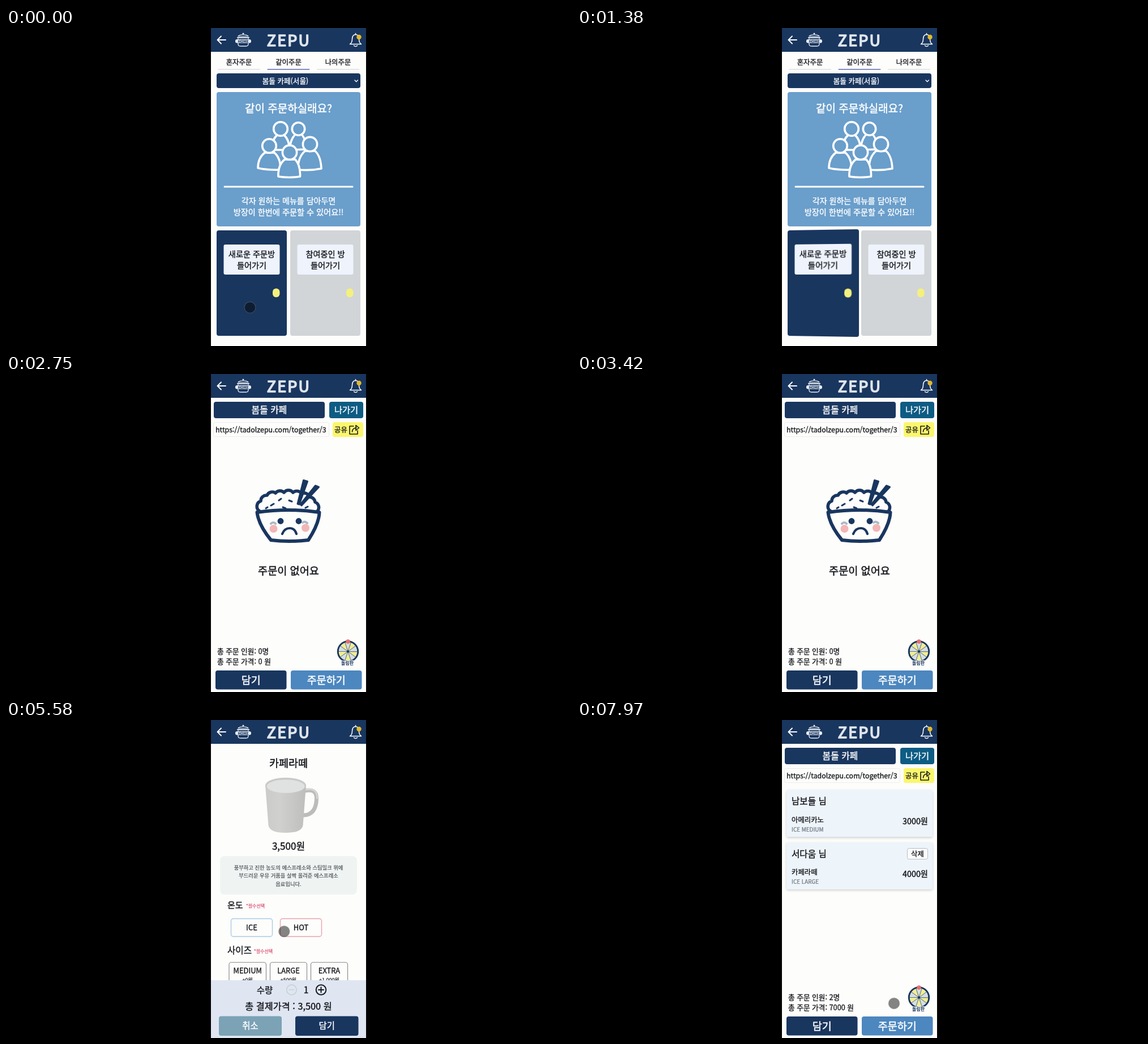
Recreate the animation shown at these times as an HTML page. Size 998 by 561 pixels, loop 8 s.

```html
<!DOCTYPE html>
<html lang="ko">
<head>
<meta charset="utf-8">
<title>같이주문</title>
<style>
html, body { margin: 0; width: 100%; height: 100%; overflow: hidden; background: #000; }
#stage { position: relative; width: 998px; height: 561px; overflow: hidden; }
svg { position: absolute; left: 0; top: 0; overflow: hidden; }
text { font-family: "Noto Sans CJK KR", "Noto Sans CJK", sans-serif; font-weight: 500; stroke-linejoin: round; }
#door { left: 372px; top: 357px; transform-origin: 0 50%; overflow: visible; }
</style>
</head>
<body>
<div id="stage">
  <svg id="base" width="998" height="561"></svg>
  <svg id="door" width="124" height="186" viewBox="372 357 124 186"></svg>
  <svg id="top" width="998" height="561"></svg>
</div>
<script>
const NAVY = '#19365f', GREY = '#d1d5d8', PAPER = '#fdfdfb', INK = '#15171c', BLUE = '#6a9ecb';
const LOOP = 8000;
const $ = id => document.getElementById(id);

// y is the vertical middle of the line; extra attributes win over the defaults
const text = (s, x, y, size, fill = INK, anchor = 'middle', extra = '') =>
  `<text ${extra} x="${x}" y="${y + size * 0.37}" font-size="${size}" fill="${fill}" text-anchor="${anchor}"
    stroke="${fill}" stroke-width="${size * 0.025}">${s}</text>`;
const left = (s, x, y, size, fill, extra) => text(s, x, y, size, fill, 'start', extra);
const box = (x1, y1, x2, y2, fill, r = 4, extra = '') =>
  `<rect x="${x1}" y="${y1}" width="${x2 - x1}" height="${y2 - y1}" rx="${r}" fill="${fill}" ${extra}/>`;
const disc = (x, y, r, fill, extra = '') => `<circle cx="${x}" cy="${y}" r="${r}" fill="${fill}" ${extra}/>`;
const line = (d, color, width, fill = 'none') =>
  `<path d="${d}" fill="${fill}" stroke="${color}" stroke-width="${width}" stroke-linecap="round" stroke-linejoin="round"/>`;
const group = (id, body) => `<g id="${id}">${body}</g>`;
const button = (s, x1, y1, x2, y2, fill, size, color = '#fff') =>
  box(x1, y1, x2, y2, fill) + text(s, (x1 + x2) / 2, (y1 + y2) / 2, size, color);

const header = () =>
  box(362, 0, 636, 561, PAPER, 0) + box(362, 0, 636, 42, NAVY, 0) +
  line('M388 21H374M380 14.5L373.5 21L380 27.5', '#fff', 2) +
  // pot
  line('M410 14.5Q413 11.5 419 11.5Q425 11.5 428 14.5Z', '#e9eef4', 1.2) +
  disc(419, 10, 1.5, '#e9eef4') +
  box(408, 16, 430, 18, '#e9eef4', 1) +
  line('M410 19V28Q410 32 414 32H424Q428 32 428 28V19', '#e9eef4', 1.3) +
  box(405, 20, 433, 26.5, '#e9eef4', 3) +
  text('HOME', 419, 23.2, 6.4, NAVY, 'middle', 'style="font-weight:700"') +
  text('ZEPU', 499.5, 22, 27, '#dfe5ec', 'middle', 'letter-spacing="2.2" stroke-width="1.7"') +
  // bell
  line('M607.5 28.5Q611.5 26 611.5 19.5Q611.5 12 617.5 11.5Q623.5 12 623.5 19.5Q623.5 26 627.5 28.5Z', '#fff', 1.5) +
  line('M614.5 31Q617.5 34 620.5 31M617.5 11V9.5', '#fff', 1.5) + disc(623.5, 16, 4.2, '#e5b92b');

const person = (x, y, r, body) => line(body, '#fff', 3.6, BLUE) + disc(x, y, r, BLUE, 'stroke="#fff" stroke-width="3.6"');

const people = () =>
  person(485, 178, 12.3, 'M469 215Q470 196 479 189H491Q500 196 501 215Z') +
  person(516.5, 178, 11.2, 'M501 215Q502 196 511 188H522Q529 194 531 214Z') +
  person(465, 208, 12.3, 'M445 247Q445 229 457 220H474Q485 229 485 250Q462 251 445 247Z') +
  person(537, 205, 12.6, 'M516 250Q515 229 528 217H546Q556 226 557 248Q538 252 516 250Z') +
  person(501, 219.5, 12.6, 'M481 262Q480 242 492 232H511Q520 242 519.5 262Q500 265 481 262Z');

const doorBody = (x, color, a) =>
  box(x, 357, x + 124, 543, color) + box(x + 12.5, 382, x + 111.5, 435, '#eef3fc', 3) +
  text(a, x + 62, 398.5, 14.2) + text('들어가기', x + 62, 419, 14.2) +
  box(x + 99, 459.5, x + 111.5, 475, '#f4f07e', 6);

const home = () =>
  ['혼자주문', '같이주문', '나의주문'].map((s, i) =>
    text(s, 411.5 + i * 87.5, 60, 12.4) +
    box(374 + i * 87.5, 72, 449 + i * 87.5, 74, i == 1 ? '#858bc4' : '#e4e6ec', 1)).join('') +
  box(372, 80, 626, 106, NAVY) + text('봄돌 카페(서울)', 493.5, 93, 12.6, '#fff') +
  line('M616 92L618.7 94.7L621.4 92', '#fff', 1.4) +
  box(372, 113, 626, 350, BLUE) + text('같이 주문하실래요?', 499, 142, 19, '#fff') +
  people() + line('M386 280H612', '#fff', 3) +
  text('각자 원하는 메뉴를 담아두면', 499, 304.5, 14, '#fff') +
  text('방장이 한번에 주문할 수 있어요!!', 499, 324.5, 14.2, '#fff') +
  doorBody(502, GREY, '참여중인 방');

const modal = () => {
  const light = 'style="font-weight:300" stroke-width="0.2"';
  return box(394.5, 202, 603.5, 361.5, PAPER, 4, `stroke="${NAVY}" stroke-width="1.6"`) +
    text('봄돌 카페에', 499, 241, 17.4, '#30343c', 'middle', light) +
    text('방을 만드시겠습니까?', 499, 268.5, 17.6, '#30343c', 'middle', light) +
    button('취소', 442, 306, 488, 336, GREY, 11.6, '#555a60') +
    button('만들기', 500, 306, 557, 336, NAVY, 11.8);
};

const wheel = () => {
  const cx = 604, cy = 489.5, r = 17;
  const at = i => `${cx + r * Math.cos(i * Math.PI / 5)} ${cy + r * Math.sin(i * Math.PI / 5)}`;
  let s = '';
  for (let i = 0; i < 10; i++)
    s += line(`M${cx} ${cy}L${at(i)}A${r} ${r} 0 0 1 ${at(i + 1)}Z`, '#5a6f80', 1, i % 2 ? '#d5dee4' : '#f1ee92');
  return s + disc(cx, cy, 17.8, 'none', `stroke="${NAVY}" stroke-width="2.8"`) + disc(cx, cy, 2.2, NAVY) +
    disc(604, 472, 3.8, '#e56f6c') +
    text('돌림판', 603, 510.5, 8, NAVY, 'middle', `stroke="${PAPER}" stroke-width="2" paint-order="stroke" style="font-weight:700"`);
};

const bowl = () => {
  const lumps = ['450 224', '461 214', '476 210', '491 209', '507 209', '522 211', '536 217', '546 226', '550 242'];
  return line('M448 242' + lumps.map(p => `A10 10 0 0 1 ${p}`).join(''), NAVY, 5.6, PAPER) +
    line('M468 232L473 229M482 223L486 220M489 235L494 237M500 223L505 225M529 236L533 234M459 237L462 235', NAVY, 3) +
    line('M525.5 187.5L532.5 189.5L518 230L515 229Z', NAVY, 3, NAVY) +
    line('M546.5 197L552.5 199.5L522 232L520 230Z', NAVY, 3, NAVY) +
    line('M443.5 244Q499 236 553.5 244Q553 264 534 293Q500 297 468 293Q446 266 443.5 244Z', NAVY, 6, PAPER) +
    disc(472.5, 273, 7, '#f2b6b6') + disc(529, 271.5, 7, '#f2b6b6') +
    line('M468 264Q472 260 476 264M524 262Q528 259 532 263', '#aab9c8', 4) +
    disc(485, 259.5, 5.4, NAVY) + disc(517, 259.5, 5.4, NAVY) +
    line('M488 282Q492 272 501 272Q510 272 513 282', NAVY, 4.2);
};

const room = () =>
  button('봄돌 카페', 367, 49, 563, 78, NAVY, 15.9) +
  button('나가기', 571, 49, 631, 78, '#0e5c84', 15.3) +
  box(366.5, 85.5, 570.5, 110.5, PAPER, 3, 'stroke="#ececec"') +
  left('https://tadolzepu.com/together/3', 370, 98, 12.4) +
  box(577, 85, 631, 111, '#fbf66c') + text('공유', 591.5, 98, 12.4) +
  line('M614 92H607V106H621V100M611.5 102Q612 95 619 95M618 90.5L623.5 95L618 99.5Z', INK, 1.6) +
  left('', 373, 489, 12.7, INK, 'id="headcount"') + left('', 373, 507, 12.7, INK, 'id="sum"') +
  wheel() +
  button('담기', 370, 523, 495.5, 556.5, NAVY, 18.5) +
  button('주문하기', 503, 523, 628.5, 556.5, '#4c87bf', 18.5);

const card = (y, name, item, option, price) =>
  box(370, y, 628, y + 83, '#edf4fa', 3, 'filter="url(#shade)"') +
  left(name + ' 님', 379, y + 20.5, 15.6) + left(item, 379, y + 53, 12.4) +
  left(option, 379, y + 70, 9.9, '#6d747c') + text(price + '원', 620, y + 56, 14.3, INK, 'end');

const orders = () =>
  card(123, '남보들', '아메리카노', 'ICE MEDIUM', 3000) +
  card(215.5, '서다움', '카페라떼', 'ICE LARGE', 4000) +
  box(583.5, 226.5, 619.5, 245.5, '#fbfcfd', 3, 'stroke="#b9bec4"') + text('삭제', 601.5, 236, 12.4);

const mug = () =>
  line('M527 125Q548.5 120 548.5 138Q548 167 526 168', '#bcbcba', 7) +
  line('M529 123Q550 119 549.5 138', '#d8d8d6', 2.5) +
  '<path d="M458 115L463.5 186Q466 199 494 199Q522 199 524.5 186L530 115Z" fill="url(#mugTone)"/>' +
  '<ellipse cx="494" cy="115.5" rx="36" ry="13.8" fill="#c9c9c7"/>' +
  '<ellipse cx="494" cy="117" rx="33.5" ry="11.8" fill="#e0e2e1"/>';

const option = (id, s, x1, x2, color) =>
  box(x1 + .5, 350.5, x2 - .5, 382, PAPER, 4, `id="${id}" stroke="${color}" stroke-width="1.4"`) +
  text(s, (x1 + x2) / 2, 366, 13);
const size = (id, s, x1, x2, extra) =>
  box(x1 + .5, 427.5, x2 - .5, 475, PAPER, 4, `id="${id}" stroke="#8c8f90" stroke-width="1.2"`) +
  text(s, (x1 + x2) / 2, 442.5, 12.9) + text(`+${extra}원`, (x1 + x2) / 2, 458.5, 9);

const detail = () =>
  text('카페라떼', 499, 76, 18.5) + mug() + text('3,500원', 499, 223, 17) +
  box(378, 240, 620, 308, '#eff4f3', 8) +
  ['풍부하고 진한 농도의 에스프레소와 스팀밀크 위에', '부드러운 우유 거품을 살짝 올려준 에스프레소', '음료입니다.']
    .map((s, i) => text(s, 499, 260.5 + i * 14.5, 9.3, '#4b5054')).join('') +
  left('온도', 391, 326, 15) + left('*필수선택', 424, 328, 8, '#d8486b') +
  option('ice', 'ICE', 397, 471, '#a9cbe9') + option('hot', 'HOT', 484, 558, '#eaa3b1') +
  left('사이즈', 391, 406.5, 15.6) + left('*필수선택', 438, 408.5, 8, '#d8486b') +
  size('medium', 'MEDIUM', 393.5, 460, '0') + size('large', 'LARGE', 466, 532, '500') +
  size('extra', 'EXTRA', 538, 604, '1,000') +
  box(362, 459, 636, 561, '#dfe6f2', 0) +
  text('수량', 457, 476, 15.2) + text('1', 530, 476, 15.5) +
  disc(504.5, 476, 8.8, 'none', 'stroke="#c8d1d1" stroke-width="1.7"') + line('M500 476H509', '#c8d1d1', 1.7) +
  disc(556.5, 476, 8.8, 'none', `stroke="${INK}" stroke-width="2"`) + line('M552 476H561M556.5 471.5V480.5', INK, 2) +
  text('', 499, 504.5, 16.3, INK, 'middle', 'id="total"') +
  button('취소', 376, 522.5, 487, 557, '#7ca2b5', 15.4) + button('담기', 511, 522.5, 622.5, 557, NAVY, 15.4);

$('base').innerHTML = `<defs>
  <linearGradient id="mugTone"><stop offset="0" stop-color="#cbcbc9"/><stop offset=".35" stop-color="#d0d0ce"/><stop offset="1" stop-color="#bebebc"/></linearGradient>
  <filter id="shade" x="-5%" y="-10%" width="110%" height="130%"><feDropShadow dx="0" dy="2" stdDeviation="2" flood-opacity=".18"/></filter>
  </defs>` + header() + group('home', home()) +
  group('room', room() + group('empty', bowl() + text('주문이 없어요', 499, 347.5, 18.6)) + group('orders', orders())) +
  group('detail', detail());
$('door').innerHTML = doorBody(372, NAVY, '새로운 주문방');
$('top').innerHTML = group('modal', modal()) +
  disc(0, 0, 9.8, '#000', 'id="touch" fill-opacity=".48" stroke="#888" stroke-opacity=".35" stroke-width="1.2"');

// [time, x, y, opacity]
const touches = [
  [0, 431, 493, 1], [750, 430, 470, 1], [1180, 430, 470, 1], [1300, 430, 470, 0],
  [1750, 540, 331, 0], [1850, 539, 331, 1], [2170, 531, 327, 1], [2420, 531, 326, 1], [2520, 531, 326, 0],
  [3850, 446, 530, 0], [3950, 444, 532, 1], [4300, 433, 540, 1], [4420, 433, 540, 0],
  [5100, 520, 385, 0], [5220, 515, 383, 1], [5580, 491.5, 373, 1], [5850, 440, 367, 1], [6150, 440, 367, 1],
  [6630, 483.5, 427, 1], [6850, 497, 442, 1], [7050, 497, 442, 1], [7400, 567, 539, 1], [7560, 567, 539, 1],
  [7970, 560, 500, 1], [8000, 560, 498, 1]
];
const touchAt = t => {
  const i = touches.findIndex(p => p[0] > t), a = touches[i - 1], b = touches[i];
  const k = (t - a[0]) / (b[0] - a[0]);
  return a.map((v, n) => v + (b[n] - v) * k);
};

const show = (id, on) => { $(id).style.display = on ? '' : 'none'; };

function draw(t) {
  const atHome = t < 2600, inDetail = t >= 4450 && t < 7600, done = t >= 7600;
  show('home', atHome);
  show('door', atHome);
  show('modal', t >= 1400 && atHome);
  show('detail', inDetail);
  show('room', !atHome && !inDetail);
  show('empty', !done);
  show('orders', done);

  const k = Math.min(1, Math.max(0, (t - 1050) / 350));
  $('door').style.transform = `perspective(600px) rotateY(${-6 * k * (2 - k)}deg)`;

  $('ice').setAttribute('fill', t >= 6000 ? '#bfdcfa' : PAPER);
  $('large').setAttribute('fill', t >= 6950 ? '#d9dde0' : PAPER);
  $('total').textContent = `총 결제가격 : ${t >= 6950 ? '4,000' : '3,500'} 원`;
  $('headcount').textContent = `총 주문 인원: ${done ? 2 : 0}명`;
  $('sum').textContent = `총 주문 가격: ${done ? 7000 : 0} 원`;

  const [, x, y, opacity] = touchAt(t);
  $('touch').setAttribute('transform', `translate(${x} ${y})`);
  $('touch').setAttribute('opacity', opacity);
}

const start = performance.now();
function tick() {
  draw((performance.now() - start) % LOOP);
  requestAnimationFrame(tick);
}
tick();
</script>
</body>
</html>
```
